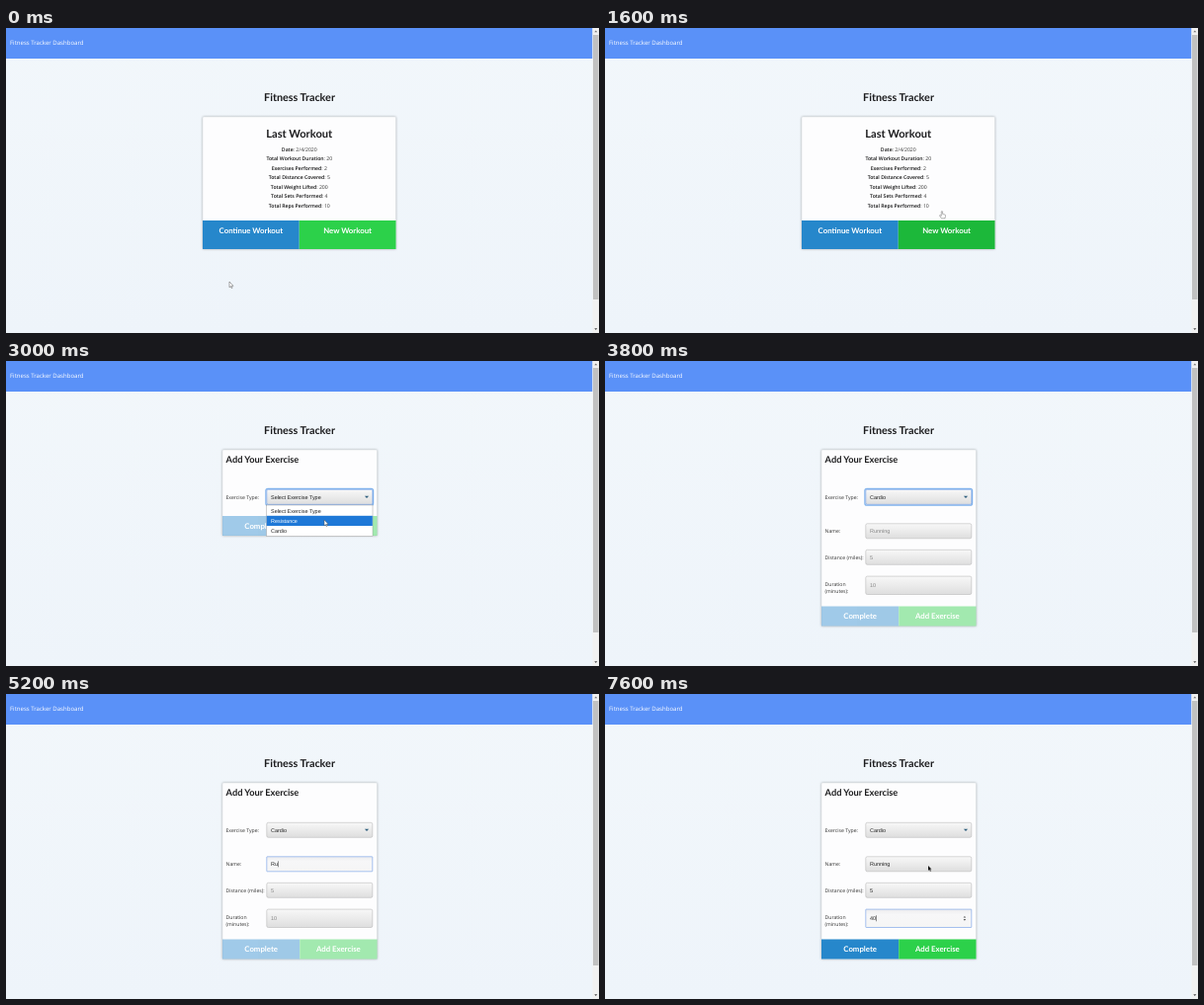
An HTML page for the animation above (8 s loop, 600 by 309 pixels).

```html
<!DOCTYPE html>
<html lang="en">
<head>
<meta charset="utf-8">
<title>Fitness Tracker</title>
<style>
  html, body { margin: 0; height: 100%; overflow: hidden; }
  svg { display: block; width: 600px; height: 309px; }
  text { font: 5.15px "Open Sans", sans-serif; fill: #333; text-rendering: geometricPrecision; white-space: pre; }
  .mid { text-anchor: middle; }
  .head { font: 700 10.8px Lato, sans-serif; fill: #1c1c1e; }
  .button { font: 700 7.8px Lato, sans-serif; fill: #fff; }
  .input { font: 5.45px "Liberation Sans", Arial, sans-serif; fill: #222; }
  .hint { fill: #858585; }
  .nav { font-size: 6.05px; fill: #fff; }
  .card { filter: drop-shadow(0 .5px 1px #0004); }
  b, .bold { font-weight: 600; fill: #111; }
</style>
</head>
<body>
<svg viewBox="0 0 600 309">
  <defs>
    <linearGradient id="sky" x2="0" y2="1"><stop stop-color="#f2f7fb"/><stop offset="1" stop-color="#eef4fa"/></linearGradient>
    <linearGradient id="field" x2="0" y2="1"><stop stop-color="#f8f8f8"/><stop offset="1" stop-color="#dedede"/></linearGradient>
    <linearGradient id="active" x2="0" y2="1"><stop stop-color="#ececee"/><stop offset=".3" stop-color="#f7f7f8"/><stop offset="1" stop-color="#f5f5f5"/></linearGradient>
  </defs>
  <rect width="600" height="309" fill="url(#sky)"/>
  <rect width="593.5" height="31" fill="#5a91f8"/>
  <text class="nav" x="4" y="16.5">Fitness Tracker Dashboard</text>
  <path d="M593.5 0h6.5v309h-6.5z" fill="#f1f1f1"/>
  <path d="M594 7h5.5v268h-5.5z" fill="#c1c1c1"/>
  <path d="M595.3 4.2l1.5-1.8 1.5 1.8z" fill="#777"/>
  <path d="M595.3 304.3l1.5 1.8 1.5-1.8z" fill="#444"/>
  <text class="head mid" x="297" y="73.5">Fitness Tracker</text>
  <g id="view"></g>
</svg>
<script>
const LOOP = 8000, STEP = 200;
const view = document.getElementById('view');

const rect = (x, y, w, h, fill, more = '') =>
  `<rect x="${x}" y="${y}" width="${w}" height="${h}" fill="${fill}" ${more}/>`;
const text = (x, y, s, cls = '', more = '') => `<text x="${x}" y="${y}" class="${cls}" ${more}>${s}</text>`;

function card(x, w, bottom) {
  return rect(x, 90, w, bottom - 90, '#fdfdfe', 'class="card" rx="1" stroke="#d5dade" stroke-width=".5"');
}

function buttons(x, y, w, h, labels, green, opacity, base) {
  const half = w / 2;
  return `<g opacity="${opacity}">` +
    rect(x, y, half, h, '#2687cb') + rect(x + half, y, half, h, green) + '</g>' +
    labels.map((s, i) => text(x + half * (i + .5), base, s, 'button mid')).join('');
}

function summary(hover) {
  const rows = [['Date', '2/4/2020'], ['Total Workout Duration', 20], ['Exercises Performed', 2],
    ['Total Distance Covered', 5], ['Total Weight Lifted', 200], ['Total Sets Performed', 4],
    ['Total Reps Performed', 10]];
  return card(199, 195.5, 224) + text(296.7, 110.7, 'Last Workout', 'head mid', 'style="font-size:11.1px"') +
    rows.map(([k, v], i) =>
      text(296.8, 124.8 + i * 9.45, `<tspan class="bold">${k}</tspan>: ${v}`, 'mid')).join('') +
    buttons(199, 195, 195.5, 29, ['Continue Workout', 'New Workout'], hover ? '#1cb83a' : '#2cd14a', 1, 207.6);
}

function field(y, h, value, { hint, focus, caret, spin, select } = {}) {
  const mid = y + h / 2;
  let s = '';
  if (focus && select) s += rect(262.9, y - .6, 108.7, h + 1.2, 'none', 'rx="2" stroke="#7fb2ec" stroke-width="1.2"');
  s += rect(263.8, y + .3, 107, h - .6, focus && !select ? 'url(#active)' : 'url(#field)',
    `rx="${focus && !select ? .5 : 1.6}" stroke="${focus ? '#6c9be6' : '#b9b9b9'}" stroke-width=".6"`);
  s += `<text x="268" y="${mid + 1.9}" class="input ${value ? '' : 'hint'}">${value || hint}</text>`;
  if (caret !== undefined) s += rect(268 + caret, mid - 3, .5, 6, '#222');
  if (spin) s += `<path d="M362.6 ${mid - .7}l1.3-1.7 1.3 1.7zM362.6 ${mid + .7}l1.3 1.7 1.3-1.7z" fill="#555"/>`;
  if (select) s += `<path d="M362.9 ${mid - 1}h4.2l-2.1 2.3z" fill="#2f5f7d"/>`;
  return s;
}

// Caret offsets follow the widths of the input font
const pen = document.createElement('canvas').getContext('2d');
function widthOf(s) {
  pen.font = '54.5px "Liberation Sans", Arial, sans-serif';
  return pen.measureText(s).width / 10;
}

function typed(t, y, h, hint, start, end, keys, spin) {
  const done = keys.filter(([at]) => t >= at).pop();
  const value = done ? done[1] : '';
  const focus = t >= start && t < end;
  return field(y, h, value, { hint, focus, spin: spin && focus, caret: focus ? widthOf(value) : undefined });
}

function menu(t) {
  const pick = t < 3000 ? 0 : t < 3200 ? 1 : 2;
  return rect(263.5, 146, 107.5, 31.5, '#fff', 'stroke="#8a8a8a" stroke-width=".4"') +
    ['Select Exercise Type', 'Resistance', 'Cardio'].map((s, i) =>
      (i === pick ? rect(263.7, 146.5 + i * 10.3, 107.1, 10.2, '#1e78d7') : '') +
      text(268, 153.6 + i * 10.3, s, 'input', i === pick ? 'style="fill:#fff"' : '')).join('');
}

function form(t) {
  const open = t >= 3800, top = open ? 248.5 : 157;
  let s = card(219, 156.5, top + 20) +
    text(222.6, 103.2, 'Add Your Exercise', 'head', 'style="font-size:9.25px"') +
    text(222.5, 140.4, 'Exercise Type:') +
    field(130, 15.6, open ? 'Cardio' : 'Select Exercise Type', { select: true, focus: t >= 2800 && t < 4600 });
  if (open) {
    const name = [[5000, 'R'], [5200, 'Ru'], [5600, 'Run'], [5800, 'Runn'], [6000, 'Runni'], [6200, 'Running']];
    s += text(222.5, 174.4, 'Name:') + text(222.5, 200.8, 'Distance (miles):') +
      text(222.5, 227.5, 'Duration') + text(222.5, 234.9, '(minutes):') +
      typed(t, 164.5, 15.6, 'Running', 4600, 6400, name) +
      typed(t, 191, 15.6, '5', 6400, 7000, [[6600, '5']], true) +
      typed(t, 217.8, 19, '10', 7000, LOOP, [[7200, '4'], [7400, '40']], true);
  }
  s += buttons(219, top, 156.5, 20, ['Complete', 'Add Exercise'], '#2cd14a', t >= 7400 ? 1 : .43, top + 12.7);
  return s + (t >= 2800 && t < 3800 ? menu(t) : '');
}

const shapes = {
  arrow: '<path d="M0 0v5.8l1.3-1.2.9 2 .9-.4-.9-1.9h1.8z" fill="#fff" stroke="#555" stroke-width=".5"/>',
  dark: '<path d="M0 0v5l1.2-1.1.8 1.8.8-.4-.8-1.7h1.5z" fill="#111"/>',
  beam: '<path d="M-1 -3h2M0 -3v6M-1 3h2" fill="none" stroke="#555" stroke-width=".5"/>',
  hand: '<path d="M-.7 .6q.7-1 1.3 0v2.6l2.4.6q.7.3.5 1.2l-.5 2.6h-3.4l-2.2-2.8q.3-1 1.1-.3l.8.6z" fill="#fff" stroke="#666" stroke-width=".5"/>'
};

// [time, x, y]
const path = [[0, 226, 257], [1200, 341, 187], [1600, 341, 185.3], [1800, 342, 183],
  [2000, 342, 183], [2600, 330, 140], [2800, 330, 140], [3000, 322, 161], [3200, 318, 171],
  [4000, 318, 171], [4400, 327, 173], [LOOP, 327, 174]];

function pointer(t) {
  const kind = t < 1000 ? 'arrow' : t < 1800 ? 'hand' : t < 3800 ? 'arrow' :
    t < 4000 ? '' : t < 5000 ? 'beam' : t < 6400 ? '' : 'dark';
  if (!kind) return '';
  const i = path.findIndex(p => p[0] > t);
  const [t0, x0, y0] = path[i - 1], [t1, x1, y1] = path[i];
  const k = (t - t0) / (t1 - t0), e = k * k * (3 - 2 * k);
  return `<g transform="translate(${x0 + (x1 - x0) * e} ${y0 + (y1 - y0) * e})">${shapes[kind]}</g>`;
}

let last = -1;
function tick() {
  const t = Math.floor(performance.now() % LOOP / STEP) * STEP;
  if (t !== last) {
    view.innerHTML = (t < 1800 ? summary(t >= 1000) : form(t)) + pointer(t);
    last = t;
  }
  requestAnimationFrame(tick);
}
tick();
</script>
</body>
</html>
```
